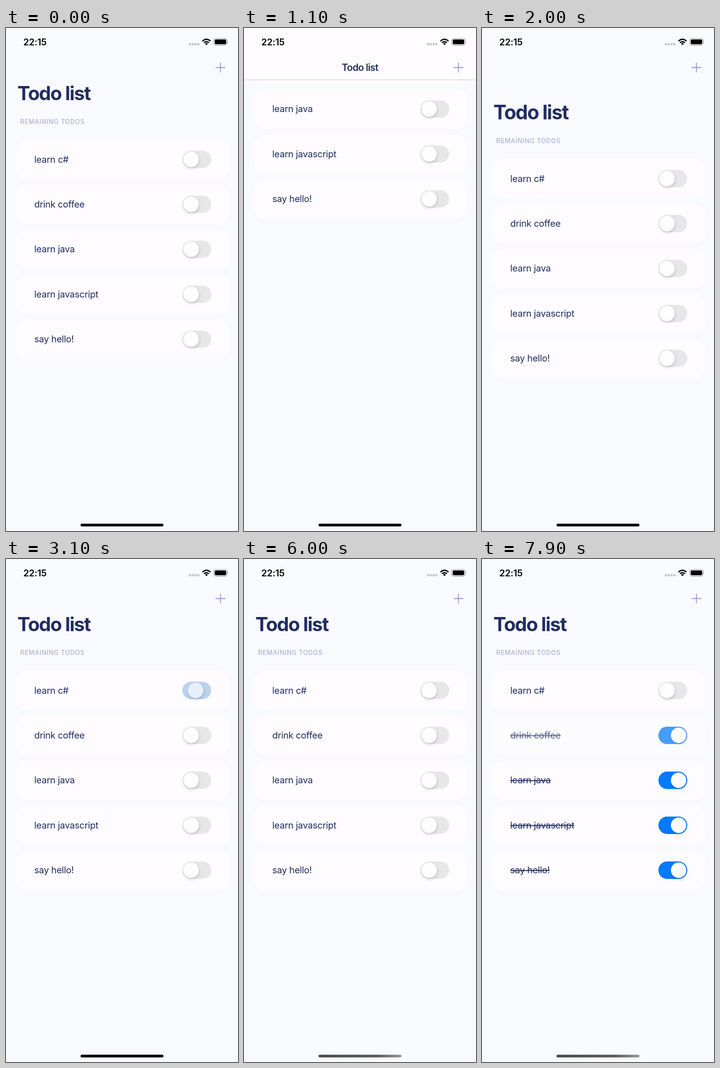
An HTML page for the animation above (8000 ms loop, 509 by 1101 pixels).

```html
<!DOCTYPE html>
<html lang="en">
<head>
<meta charset="utf-8">
<title>Todo list</title>
<style>
  html, body { margin: 0; width: 100%; height: 100%; overflow: hidden; background: #f9fafe; }
  svg { display: block; width: 509px; height: 1101px; font-family: Inter, "Liberation Sans", sans-serif; }
  .clock { font-size: 20px; font-weight: 600; letter-spacing: -.2px; }
  .large { font-size: 42px; font-weight: 700; letter-spacing: -1.6px; fill: #222e61; }
  .small { font-size: 21px; font-weight: 600; letter-spacing: -.7px; fill: #222e61; text-anchor: middle; }
  .caption { font-size: 14px; font-weight: 500; letter-spacing: .6px; fill: #abb3d3; }
  .label { font-size: 20.1px; letter-spacing: -.3px; fill: #1f2b5e; }
  .done { text-decoration: line-through; }
  .card { fill: #fefcff; }
  .knob { fill: #fffdff; filter: drop-shadow(1px 3px 3px rgba(0, 0, 0, .16)); }
</style>
</head>
<body>
<svg viewBox="0 0 509 1101">
  <defs>
    <clipPath id="below"><rect y="113" width="509" height="988"/></clipPath>
    <linearGradient id="sheen">
      <stop stop-color="#4d4d4f"/><stop offset=".7" stop-color="#5c5c5e"/><stop offset="1" stop-color="#9a9a9c"/>
    </linearGradient>
  </defs>
  <rect width="509" height="1101" fill="#f9fafe"/>
  <g clip-path="url(#below)">
    <g id="list">
      <g id="title"><text class="large" y="0">Todo list</text></g>
      <text class="caption" x="31" y="209.5">REMAINING TODOS</text>
    </g>
  </g>
  <g id="bar">
    <rect width="509" height="113" fill="#fefcff"/>
    <path d="M0 113.5H509" stroke="#c9c8cd"/>
    <text class="small" x="254.5" y="94">Todo list</text>
  </g>
  <text class="clock" x="38" y="38">22:15</text>
  <g fill="#c6c6c9">
    <rect x="401.5" y="33" width="4.6" height="5" rx="1"/>
    <rect x="407.5" y="33" width="4.6" height="5" rx="1"/>
    <rect x="413.6" y="33" width="4.6" height="5" rx="1"/>
    <rect x="419.7" y="33" width="4.6" height="5" rx="1"/>
  </g>
  <g fill="none" stroke="#000" stroke-width="2.8">
    <path d="M431 28.6Q439.8 20.6 448.6 28.6M434.3 32.3Q439.8 27.6 445.3 32.3"/>
    <path d="M436.7 34.4Q439.8 31.8 442.9 34.4L439.8 37.6Z" fill="#000" stroke="none"/>
  </g>
  <rect x="456" y="23" width="29" height="14.6" rx="4.4" fill="none" stroke="#8e8e90" stroke-width="1.2"/>
  <rect x="458" y="25" width="25" height="10.6" rx="2.8"/>
  <path d="M486.3 28Q488.6 30.3 486.3 32.7Z" fill="#8e8e90"/>
  <path d="M459.8 86.5H481.2M470.5 75.8V97.2" stroke="#8f94d4" stroke-width="1.8"/>
  <rect id="home" x="163.5" y="1085" width="182" height="6" rx="3"/>
</svg>
<script>
const LOOP = 8000, STEP = 100;
const $ = id => document.getElementById(id);

// [time, scroll offset]; negative offsets pull the list down
const SCROLL = [
  [400, 0], [500, 12], [600, 70], [700, 158], [800, 236], [900, 287], [1000, 309],
  [1100, 307], [1200, 195], [1300, 32], [1400, -95], [1500, -177], [1600, -217],
  [1700, -235], [1800, -190], [1900, -104], [2000, -42], [2100, -12], [2200, 0]
];

// on/off: times at which a switch slides; press: time the whole row dims
const ROWS = [
  { text: "learn c#", on: 3000, off: 5400 },
  { text: "drink coffee", on: 3800, off: 4800, press: 7800 },
  { text: "learn java", press: 7300 },
  { text: "learn javascript", press: 6800 },
  { text: "say hello!", press: 6400 }
];
const SLIDE = [[0, 0], [100, .4], [200, .88], [300, 1]];
const DIM = [[-100, 1], [0, .4], [100, .72], [200, .92], [300, 1]];

function sample(keys, t) {
  if (t <= keys[0][0]) return keys[0][1];
  for (let i = 1; i < keys.length; i++) {
    const [t0, a] = keys[i - 1], [t1, b] = keys[i];
    if (t <= t1) return a + (b - a) * (t - t0) / (t1 - t0);
  }
  return keys[keys.length - 1][1];
}

function add(parent, tag, attrs) {
  const node = document.createElementNS("http://www.w3.org/2000/svg", tag);
  for (const key in attrs) node.setAttribute(key, attrs[key]);
  return parent.appendChild(node);
}

ROWS.forEach((row, i) => {
  const g = row.group = add($("list"), "g", { transform: `translate(0 ${245 + i * 98.4})` });
  add(g, "rect", { class: "card", x: 22, width: 468, height: 86, rx: 24 });
  row.label = add(g, "text", { class: "label", x: 62, y: 49.7 });
  row.label.textContent = row.text;
  row.track = add(g, "rect", { x: 387, y: 23.5, width: 63.3, height: 38.2, rx: 19.1 });
  row.knob = add(g, "circle", { class: "knob", cy: 42.6, r: 16.9 });
});

function switchState(row, t) {
  let p = 0;
  if (row.on) p = sample(SLIDE, t - row.on) - sample(SLIDE, t - row.off);
  if (row.press) p += t >= row.press + STEP ? 1 : 0;
  return p;
}

const mix = (a, b, k) => `rgb(${a.map((v, i) => Math.round(v + (b[i] - v) * k))})`;

function draw(t) {
  const y = sample(SCROLL, t);
  $("list").setAttribute("transform", `translate(0 ${-y})`);
  const zoom = 1 + Math.min(.1, Math.max(0, -y) / 1500);
  $("title").setAttribute("transform", `translate(25 158) scale(${y <= -150 ? 1.1 : zoom})`);
  $("bar").setAttribute("opacity", y > 62 ? 1 : 0);
  $("home").setAttribute("fill", t >= 3300 ? "url(#sheen)" : "#000");

  for (const row of ROWS) {
    const p = switchState(row, t);
    row.track.setAttribute("fill", mix([231, 231, 233], [0, 122, 255], p ** 1.8));
    row.knob.setAttribute("cx", 406 + 25.3 * p);
    row.knob.style.fill = mix([255, 253, 255], [205, 226, 250], 2 * p * (1 - p));
    row.label.classList.toggle("done", p > .5);
    row.group.setAttribute("opacity", row.press ? sample(DIM, t - row.press) : 1);
  }
}

const start = performance.now();
function tick() {
  const t = (performance.now() - start) % LOOP;
  draw(Math.floor(t / STEP) * STEP);
  requestAnimationFrame(tick);
}
tick();
</script>
</body>
</html>
```
